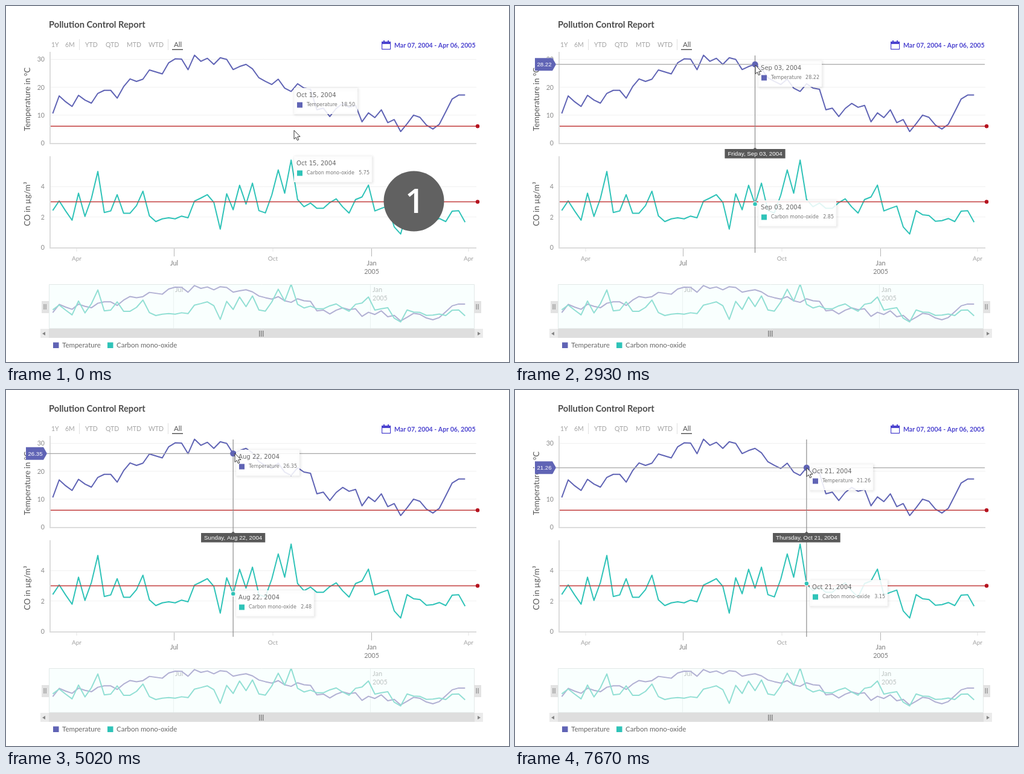
Recreate the animation shown at these times as an HTML page with a canvas. Size 833 by 590 pixels, loop 8.99 s.

```html
<!DOCTYPE html>
<html lang="en">
<head>
<meta charset="utf-8">
<title>Pollution Control Report</title>
<style>
html, body { margin: 0; width: 100%; height: 100%; overflow: hidden; background: #fff; }
canvas { display: block; }
</style>
</head>
<body>
<canvas id="stage" width="833" height="590"></canvas>
<script>
const ctx = document.getElementById('stage').getContext('2d');
const LOOP = 8990;
const LATO = 'Lato, sans-serif', DEJAVU = '"DejaVu Sans", sans-serif', ARIAL = '"Liberation Sans", Arial, sans-serif';
const BLUE = '#6064b5', TEAL = '#2fc3b8', AXIS = '#dcdcdc';

const temperature = [
  10.6, 16.9, 14.8, 13.1, 17.1, 15.4, 14.3, 17.8, 18.9, 18.9, 16.1, 20.2, 23, 22.1, 22.9, 26.2, 25.5, 24.8, 28.8, 30.2, 30.1, 26.3,
  31.5, 29.3, 30.4, 28.2, 30.6, 30, 26.35, 27.44, 28.22, 26.6, 23.4, 22.1, 21, 22.9, 19.7, 18.5, 21.26, 19.7, 19.3, 11.9, 12.5,
  9.5, 12.4, 14.2, 12.8, 13.5, 7.6, 10.8, 9.1, 11.9, 7.3, 8.4, 4.1, 6.9, 10, 9.2, 6.4, 5, 6.7, 11.2, 15.8, 17.2, 17.2];
const carbon = [
  2.43, 3.06, 2.4, 1.79, 3.57, 2.04, 3.22, 5, 2.3, 2.4, 3.47, 2.25, 2.25, 2.75, 3.7, 2.08, 1.7, 1.88, 1.95, 1.88, 2.06, 1.95,
  3.05, 3.25, 3.47, 2.97, 1.2, 3.53, 2.48, 4.09, 2.85, 4.23, 2.42, 2.27, 3.45, 5.1, 3.57, 5.75, 3.15, 2.68, 2.92, 2.57, 2.57,
  2.95, 3.2, 2.67, 2.26, 3.15, 3.32, 4.1, 2.4, 2.57, 2.72, 1.35, 0.88, 2.42, 2.15, 2.1, 1.72, 1.76, 1.9, 1.7, 2.39, 2.42, 1.66];

const pointX = i => 77.4 + i * 10.67;
const tempY = v => 227 - v * 4.617;
const carbonY = v => 400 - v * 25.15;

// start time, active point, hovering the point itself, cursor x, cursor y
const poses = [
  [0, 37, 0, 477, 206], [480, 37, 0, 476.5, 206], [1110, 37, 0, 472, 170], [1260, 37, 0, 472, 169],
  [1420, 37, 0, 471, 162], [1650, 30, 0, 410, 161], [1800, 30, 0, 403, 160], [2030, 30, 0, 402, 146],
  [2160, 30, 0, 402, 125], [2290, 30, 0, 401, 110], [2440, 30, 0, 400, 100], [2600, 30, 1, 398, 98],
  [3630, 29, 0, 384, 100], [3950, 28, 1, 379, 105], [6000, 30, 0, 400, 118], [6130, 33, 0, 432, 128],
  [6280, 37, 0, 473, 133], [6430, 38, 1, 483, 130], [7000, 38, 1, 483, 129]
];

function rect(x, y, w, h, color) {
  ctx.fillStyle = color;
  ctx.fillRect(x, y, w, h);
}

function text(str, x, y, font, color, align = 'left') {
  ctx.font = font;
  ctx.fillStyle = color;
  ctx.textAlign = align;
  ctx.fillText(str, x, y);
}

function path(points, { fill, stroke, width = 1, close = false }) {
  ctx.beginPath();
  points.forEach(([x, y]) => ctx.lineTo(x, y));
  if (close) ctx.closePath();
  if (fill) { ctx.fillStyle = fill; ctx.fill(); }
  if (stroke) { ctx.strokeStyle = stroke; ctx.lineWidth = width; ctx.stroke(); }
}

const line = (x1, y1, x2, y2, stroke, width = 1) => path([[x1, y1], [x2, y2]], { stroke, width });

function disc(x, y, r, color) {
  ctx.beginPath();
  ctx.arc(x, y, r, 0, Math.PI * 2);
  ctx.fillStyle = color;
  ctx.fill();
}

function series(values, toY, stroke) {
  path(values.map((v, i) => [pointX(i), toY(v)]), { stroke, width: 2 });
}

function verticalTitle(str, y) {
  ctx.save();
  ctx.translate(40, y);
  ctx.rotate(-Math.PI / 2);
  text(str, 0, 0, `13.3px ${LATO}`, '#5a5a5a', 'center');
  ctx.restore();
}

function drawHeader() {
  text('Pollution Control Report', 71, 36, `bold 14.7px ${LATO}`, '#4c4c4c');
  [['1Y', 75], ['6M', 98], ['YTD', 131], ['QTD', 165], ['MTD', 200], ['WTD', 236]]
    .forEach(([label, x]) => text(label, x, 68, `10.5px ${LATO}`, '#a4a4a4'));
  text('All', 278, 68, `11.5px ${LATO}`, '#555');
  rect(275, 71.5, 18, 1.5, '#555');
  line(121.5, 55, 121.5, 73, '#e0e0e0');
  line(268.5, 55, 268.5, 73, '#e0e0e0');
  const ink = '#4b43cf';
  ctx.strokeStyle = ink;
  ctx.lineWidth = 1.2;
  ctx.strokeRect(622.6, 59.6, 14, 12);
  rect(622, 59, 15, 4, ink);
  rect(625, 57, 2, 3, ink);
  rect(632, 57, 2, 3, ink);
  text('Mar 07, 2004 - Apr 06, 2005', 643, 69, `bold 10.6px ${LATO}`, ink);
}

function drawPlot(values, toY, ticks, top, color, limit) {
  ticks.forEach(v => {
    if (v) line(74, toY(v), 779, toY(v), '#f1f1f1');
    text(v, 64, toY(v) + 4, `10.6px ${LATO}`, '#8a8a8a', 'right');
  });
  rect(72, top, 2, toY(0) + 2 - top, AXIS);
  rect(72, toY(0), 707, 2, AXIS);
  series(values, toY, color);
  line(74, toY(limit), 780, toY(limit), '#c23b3b', 1.4);
  disc(781, toY(limit), 3.2, '#b5121f');
}

function drawTimeAxis() {
  [['Apr', 117], ['Oct', 442], ['Apr', 766]].forEach(([label, x]) => {
    line(x, 402, x, 407, '#e2e2e2');
    text(label, x, 422, `10px ${LATO}`, '#a0a0a0', 'center');
  });
  [['Jul', 278.5], ['Jan', 605.5]].forEach(([label, x]) => {
    line(x, 402, x, 415, '#b5b5b5');
    text(label, x, 430, `11px ${LATO}`, '#7c7c7c', 'center');
  });
  text('2005', 605.5, 444, `10.6px ${LATO}`, '#7c7c7c', 'center');
}

function drawNavigator() {
  rect(71, 461, 705, 74, '#f9fffe');
  ctx.strokeStyle = '#e2e8e7';
  ctx.lineWidth = 1;
  ctx.strokeRect(71.5, 461.5, 704, 73);
  line(277.5, 462, 277.5, 534, '#eaf1f0');
  line(603.5, 462, 603.5, 534, '#eaf1f0');
  text('Jul', 280, 474, `11px ${LATO}`, '#bcc2c1');
  text('Jan', 607, 474, `11px ${LATO}`, '#bcc2c1');
  text('2005', 607, 488, `10.6px ${LATO}`, '#bcc2c1');
  ctx.save();
  ctx.beginPath();
  ctx.rect(72, 462, 703, 72);
  ctx.clip();
  series(temperature, v => 530.7 - v * 2.14, '#b1b0d3');
  series(carbon, v => 534.8 - v * 12.83, '#92dfd4');
  ctx.restore();

  [59, 775].forEach(x => {
    rect(x, 489, 12, 20, '#e3e3e3');
    rect(x + 3.5, 494, 1.2, 9, '#8a8a8a');
    rect(x + 6.5, 494, 1.2, 9, '#8a8a8a');
  });
  rect(57, 535, 733, 15, '#ebebeb');
  rect(71, 535, 705, 15, '#dedede');
  path([[60, 543], [65, 540], [65, 546]], { fill: '#848484', close: true });
  path([[786, 543], [781, 540], [781, 546]], { fill: '#848484', close: true });
  [419, 422, 425].forEach(x => rect(x, 538, 1.5, 10, '#858585'));
}

function drawLegend() {
  [['Temperature', 78, BLUE], ['Carbon mono-oxide', 168, TEAL]].forEach(([label, x, color]) => {
    rect(x, 557.5, 9.5, 9.5, color);
    text(label, x + 15, 566, `11.5px ${LATO}`, '#666');
  });
}

function drawTooltip(x, y, width, date, name, value, color) {
  const left = Math.round(x + 5), top = Math.round(y - 6);
  ctx.save();
  ctx.shadowColor = 'rgba(0,0,0,.35)';
  ctx.shadowBlur = 4;
  ctx.shadowOffsetX = ctx.shadowOffsetY = 1;
  ctx.strokeStyle = '#e4e4e4';
  ctx.lineWidth = 1;
  ctx.strokeRect(left + .5, top + .5, width, 42);
  ctx.restore();
  rect(left, top, width + 1, 43, 'rgba(255,255,255,.86)');
  text(date, left + 4, top + 14.5, `10.1px ${DEJAVU}`, '#666');
  rect(left + 5, top + 23.5, 9, 9, color);
  text(name, left + 21, top + 29.5, `8px ${DEJAVU}`, '#777');
  text(value.toFixed(2), left + width - 3, top + 29.5, `8px ${DEJAVU}`, '#777', 'right');
}

function drawMarker(x, y, color, hovered) {
  if (hovered) return disc(x, y, 5, color);
  disc(x, y, 4.5, '#fff');
  disc(x, y, 3.2, color);
}

function drawCrosshair(x, date, weekday) {
  line(x, 82, x, 409, '#8c8c8c', 1.2);
  const label = `${weekday}, ${date}`;
  ctx.font = `9.8px ${ARIAL}`;
  const width = ctx.measureText(label).width + 10;
  path([[x - 4, 238], [x, 234.5], [x + 4, 238]], { fill: '#595959', close: true });
  rect(x - width / 2, 237, width, 15.5, '#595959');
  text(label, x, 248, ctx.font, '#fff', 'center');
}

function drawValueLine(y, value) {
  line(68, y, 778, y, '#a6a6a6', 1.2);
  path([[33, y - 10.5], [62, y - 10.5], [68, y], [62, y + 10.5], [33, y + 10.5]], { fill: BLUE, close: true });
  text(value.toFixed(2), 48.5, y + 3.5, `9.7px ${ARIAL}`, '#fff', 'center');
}

function drawCursor(x, y) {
  const outline = [[0, 0], [0, 14.5], [3.3, 11.6], [5.4, 16.6], [7.8, 15.6], [5.7, 10.8], [10, 10.4]];
  path(outline.map(([dx, dy]) => [x + dx, y + dy]), { fill: '#fff', stroke: '#333', close: true });
}

function draw(time) {
  const [, index, hovered, cursorX, cursorY] = poses.findLast(p => p[0] <= time);
  const x = pointX(index), temp = temperature[index], co = carbon[index];
  const day = new Date(Date.UTC(2004, 2, 7 + index * 6));
  const format = options => day.toLocaleDateString('en-US', { timeZone: 'UTC', ...options });
  const date = format({ month: 'short', day: '2-digit', year: 'numeric' });
  const intro = time < 100;

  rect(0, 0, 833, 590, '#fff');
  ctx.lineJoin = 'round';
  drawHeader();
  verticalTitle('Temperature in °C', 154.5);
  verticalTitle('CO in µg/m³', 328);
  drawPlot(temperature, tempY, [0, 10, 20, 30], 76, BLUE, 6);
  drawPlot(carbon, carbonY, [0, 2, 4], 249, TEAL, 3);
  drawTimeAxis();
  drawNavigator();
  drawLegend();

  if (!intro) {
    drawCrosshair(x, date, format({ weekday: 'long' }));
    if (hovered) drawValueLine(tempY(temp), temp);
    drawMarker(x, tempY(temp), BLUE, hovered);
    drawMarker(x, carbonY(co), TEAL, false);
  }
  drawTooltip(x, tempY(temp), 104, date, 'Temperature', temp, BLUE);
  drawTooltip(x, carbonY(co), 128, date, 'Carbon mono-oxide', co, TEAL);
  if (intro) {
    disc(675.5, 323.5, 50, '#616161');
    text('1', 677, 343, '600 56px "Open Sans", sans-serif', '#fff', 'center');
  }
  drawCursor(cursorX, cursorY);
}

const start = performance.now();
function tick() {
  draw((performance.now() - start) % LOOP);
  requestAnimationFrame(tick);
}
tick();
</script>
</body>
</html>
```
